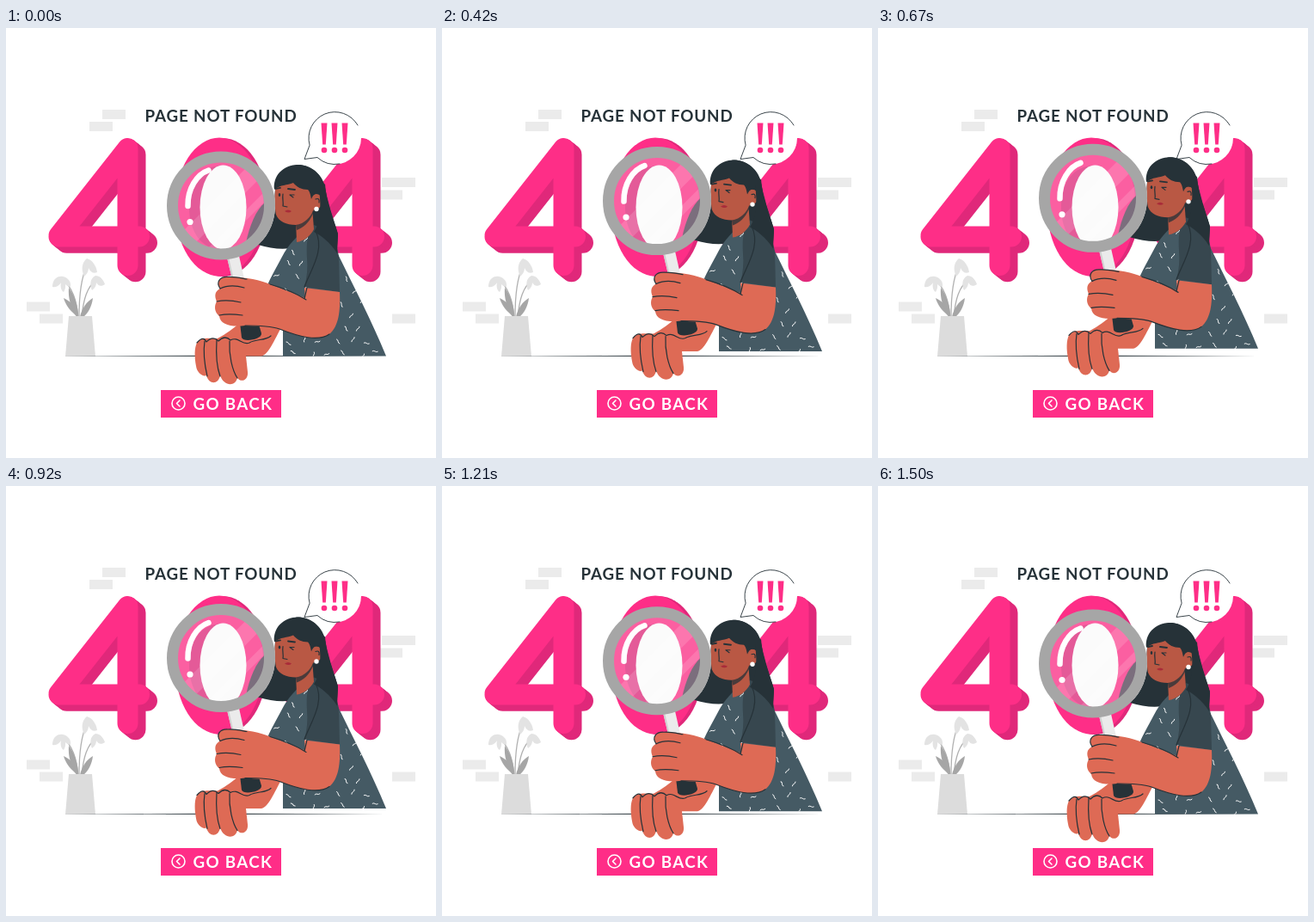
Animation of 500x500 px, one loop 1540 ms. Source, as an HTML page:

```html
<!DOCTYPE html>
<html lang="en">
<head>
<meta charset="utf-8">
<title>Page not found</title>
<style>
html, body { margin: 0; width: 100%; height: 100%; overflow: hidden; background: #fff; }
svg { display: block; width: 100vw; height: 100vh; }
text { font-family: Lato, "Open Sans", sans-serif; font-weight: 700; }
.ink { fill: none; stroke: #263238; stroke-width: 1.2; stroke-linecap: round; stroke-linejoin: round; }
.hair { fill: #263238; }
.skin { fill: #de6a55; }
.face { fill: #b95844; }
.leaf { fill: #a6a6a6; }
.petal { fill: #e3e3e3; }
</style>
</head>
<body>
<svg viewBox="0 0 500 500">
  <defs>
    <path id="bars" d="M61.500 241.500 L141.500 140 V276 M61.500 242.500 H155" fill="none" stroke-width="24" stroke-linecap="round" stroke-linejoin="round"/>
    <g id="four">
      <g id="depth" stroke="#e0287a"></g>
      <use href="#bars" stroke="#fe2e87"/>
    </g>
    <path id="dressShape" d="M352 231 C338 242 328 252 321 266 C313 281 306 293 302 304 L322 342 V381.500 H442 C425 340 405 302 386 263 L370 236 Z"/>
    <clipPath id="dressClip"><use href="#dressShape"/></clipPath>
    <clipPath id="lensClip"><circle cx="250" cy="206.500" r="51"/></clipPath>
  </defs>

  <g id="bricks" fill="#ebebeb"></g>

  <use href="#four"/>
  <use href="#four" x="273"/>
  <ellipse cx="252" cy="208.500" rx="52" ry="80.500" fill="#e0287a"/>
  <ellipse cx="248" cy="208" rx="51.500" ry="80.500" fill="#fe2e87"/>
  <path d="M252 160 C226 160 213 181 213 208 S226 258 252 258 Z" fill="#e0287a"/>
  <ellipse cx="252.500" cy="208.500" rx="27" ry="49" fill="#fff"/>

  <!-- plant -->
  <g fill="none" stroke="#b0b0b0" stroke-width="1.300">
    <path d="M84 336 C82 318 78 301 64 291"/>
    <path d="M85 336 C85 312 87 291 94 277"/>
    <path d="M88 336 C90 316 94 301 105 293"/>
  </g>
  <path class="leaf" d="M84 336 C76 331 69 322 67 314 C76 318 83 326 84 336 Z"/>
  <path class="leaf" d="M82 336 C75 325 72 313 73 302 C80 311 84 324 84 336 Z"/>
  <path class="leaf" d="M86 336 C88 326 94 318 101 314 C100 323 96 331 90 336 Z"/>
  <path class="petal" d="M66 289 C59 288 54 293 54 301 C59 302 62 299 64 296 C63 301 64 305 67 307 C70 303 70 296 66 289 Z"/>
  <path class="petal" d="M66 289 C72 290 76 295 75 301 C69 300 66 296 66 289 Z"/>
  <path class="petal" d="M94 268 C88 273 87 281 91 289 C94 286 96 283 96 279 C98 284 102 286 106 284 C105 277 101 270 94 268 Z"/>
  <path class="petal" d="M104 288 C98 291 97 298 100 305 C104 302 105 299 105 296 C107 300 111 301 115 298 C113 292 109 288 104 288 Z"/>
  <path d="M73 335 H100 L104 382 H69 Z" fill="#dcdcdc"/>

  <path d="M65 381.300 L250 380.700 L441 381.300 L250 381.900 Z" fill="#263238"/>

  <!-- speech bubble -->
  <circle cx="382.500" cy="128" r="30.500" fill="#fff"/>
  <path d="M353.100 136.200 L347 152.500 L365 153 Z" fill="#fff"/>
  <path class="ink" style="stroke-width:.9" d="M409 113 A30.500 30.500 0 0 0 353.100 136.200 L347 152.500 L362 150.500 A30.500 30.500 0 0 0 388 158"/>
  <g id="marks" fill="#fe2e87"></g>

  <g id="figure">
    <!-- hair behind the face -->
    <path class="hair" d="M338 159 C350 158 365 167 370 181 C374 202 380 221 386 239 L385 254 C374 245 360 241 349 250 C337 258 315 259 293 252 C307 240 314 222 313 200 C311 182 318 163 338 159 Z"/>
    <path d="M301 203 C291 211 283 230 279 250 C290 257 302 257 309 248 L313 203 Z" fill="#37474f" opacity=".85" clip-path="url(#lensClip)"/>

    <use href="#dressShape" fill="#455a64"/>
    <g id="dashes" clip-path="url(#dressClip)" fill="none" stroke="#fff" stroke-width=".9" stroke-linecap="round"></g>
    <path d="M358 229 C376 235 385 248 387 266 L388 307 L347 301 C350 290 351 279 350 268 C349 250 350 239 358 229 Z" fill="#37474f"/>
    <path class="ink" d="M360 236 C371 258 355 280 347 301"/>

    <!-- neck and face -->
    <path class="face" d="M337 224 L338 249 C346 248 354 242 358 234 L356 207 Z"/>
    <path class="face" d="M314 180 C312 195 312 207 314 217 C317 225 326 229 337 229 C347 228 355 219 358 211 C364 211 368 207 368 201 C368 194 360 190 355 196 L351 178 Z"/>
    <path d="M337 229 C347 228 355 219 357 212 L357 216 C352 227 346 232 338 235 Z" fill="#263238" opacity=".75"/>
    <path class="hair" d="M312 188 C310 172 322 159 340 159 C357 160 369 171 371 189 L365 194 C360 191 357 194 355 199 C354 193 353 190 351 188 C344 188 338 185 334 180 C327 183 319 182 312 188 Z"/>
    <path class="hair" d="M364 188 L371 181 C373 209 383 224 386 241 L385 262 C377 249 366 241 358 237 C365 226 367 211 364 188 Z"/>
    <path class="ink" d="M322 193 C321 199 323 203 322 207 L327 208"/>
    <path class="ink" style="stroke-width:1.800" d="M314 187 L319 186 M328 187 L336 188"/>
    <path class="ink" d="M330 194 L335 194 M330 194 L334 197"/>
    <ellipse class="hair" cx="318" cy="194" rx="1.300" ry="2"/>
    <path d="M324 213 Q328 210 332 213 Q329 216 324 213 Z" fill="#a92b39"/>
    <path class="ink" d="M360 199 Q365 197 364 203"/>
    <circle cx="361" cy="210.500" r="2.700" fill="#fff"/>

    <!-- lower hand -->
    <path class="skin" d="M322 345 C314 358 306 380 297 381.500 H279 L281 400 C282 409 274 413 269 407 C266 418 253 416 249 404 C247 415 236 415 233 404 C229 406 222 401 221 393 C219 382 219 372 222 366 C227 359 236 361 246 361 C257 355 263 350 272 343 Z"/>
    <path class="ink" d="M231 364 C229 378 231 392 234 405 M245 363 C244 379 245 394 249 405 M260 364 C259 380 263 398 269 407"/>
    <path class="ink" d="M222 366 C228 359 231 361 233 365 C238 360 243 360 247 364 C252 359 257 359 261 363 C270 358 275 370 283 366 C291 361 302 364 308 358"/>

    <!-- magnifier -->
    <path d="M257 267 L271 265 L283 318 L270 321 Z" fill="#ebebeb"/>
    <path d="M257 267 L259 266.500 L271 320 L270 321 Z" fill="#d0d0d0"/>
    <path d="M269 317 L285 314 L297 355 C298 362 276 366 274 360 Z" class="hair"/>
    <g clip-path="url(#lensClip)">
      <rect x="198" y="155" width="104" height="104" fill="#ededed" opacity=".25"/>
      <path d="M193 249 L282 160 L296 174 L207 263 Z M222 269 L306 185 L312 191 L228 275 Z" fill="#fff" opacity=".14"/>
    </g>
    <path d="M235.500 165.500 C222 170 211 187 211.500 207" fill="none" stroke="#fff" stroke-width="6.500" stroke-linecap="round"/>
    <circle cx="214" cy="225.500" r="3.600" fill="#fff"/>
    <circle cx="250" cy="206.500" r="56.500" fill="none" stroke="#a6a6a6" stroke-width="13"/>

    <!-- upper arm and grip -->
    <path class="skin" d="M347 302 L388 307 C389 329 387 347 376 356 C363 365 341 359 318 350 C303 347 291 347 278 346 C262 348 249 345 248 335 C242 330 242 323 245 318 C242 311 243 306 249 303 C244 296 248 289 258 289.500 C281 290 296 293 307 298 C320 303 334 308 348 314 Z"/>
    <path class="ink" d="M350 302 L347 315 M307 298 C321 302 335 307 349 316"/>
    <path class="ink" d="M249 303 C257 299 267 299 277 302 M245 318 C255 316 264 317 273 319 M248 334 C258 332 267 333 275 334"/>
    <path class="ink" d="M249 303 C244 296 248 289 258 289.500 C266 289 274 291 280 292"/>
    <path class="ink" d="M278 346 C291 346 306 346 318 350 C341 359 363 365 376 356"/>
  </g>

  <text x="161.500" y="108.500" font-size="18.800" letter-spacing=".85" fill="#263238">PAGE NOT FOUND</text>
  <rect x="180" y="421" width="140" height="32" fill="#ff2d87"/>
  <g fill="none" stroke="#fff" stroke-width="1.600" stroke-linecap="round" stroke-linejoin="round">
    <circle cx="200.500" cy="436.500" r="7.500"/>
    <path d="M202 433 L198.500 436.500 L202 440"/>
  </g>
  <text x="217.500" y="443.500" font-size="18.800" letter-spacing="1.300" fill="#fff">GO BACK</text>
</svg>
<script>
const LOOP = 1540, PEAK = 700, REST = 1500, LIFT = 9;
const el = id => document.getElementById(id);

el('depth').innerHTML = [9, 7, 5, 3, 1]
  .map(d => `<use href="#bars" x="${d}" y="${d * 0.8}"/>`).join('');

el('bricks').innerHTML = [[112, 95], [97, 109], [24, 318.5], [39, 332.5], [437, 174, 39], [434, 188.5], [449, 332.5]]
  .map(([x, y, w = 27]) => `<rect x="${x}" y="${y}" width="${w}" height="11"/>`).join('');

el('marks').innerHTML = [370, 382, 394]
  .map(x => `<path d="M${x - 3.5} 110.500 h7 l-1.700 25 h-3.600 Z"/><circle cx="${x}" cy="142" r="3.300"/>`).join('');

// scattered dress print
let dashes = '';
for (let row = 0; row < 10; row++) {
  for (let col = 0; col < 8; col++) {
    const n = row * 8 + col;
    const x = 308 + col * 19 + (row % 2) * 9 + Math.sin(n * 4.1) * 3;
    const y = 244 + row * 15 + Math.cos(n * 2.7) * 3;
    dashes += `<path transform="translate(${x.toFixed(1)} ${y.toFixed(1)}) rotate(${(n * 67) % 180})" d="M-3 0 q1.500 -1 3 0 t3 0"/>`;
  }
}
el('dashes').innerHTML = dashes;

const figure = el('figure');
function draw(t) {
  const k = t < PEAK ? t / PEAK : Math.max(0, (REST - t) / (REST - PEAK));
  figure.setAttribute('transform', `translate(0 ${(-LIFT * k).toFixed(3)})`);
}

const start = performance.now();
function tick(now) {
  draw(Math.max(0, now - start) % LOOP);
  requestAnimationFrame(tick);
}
draw(0);
requestAnimationFrame(tick);
</script>
</body>
</html>
```
